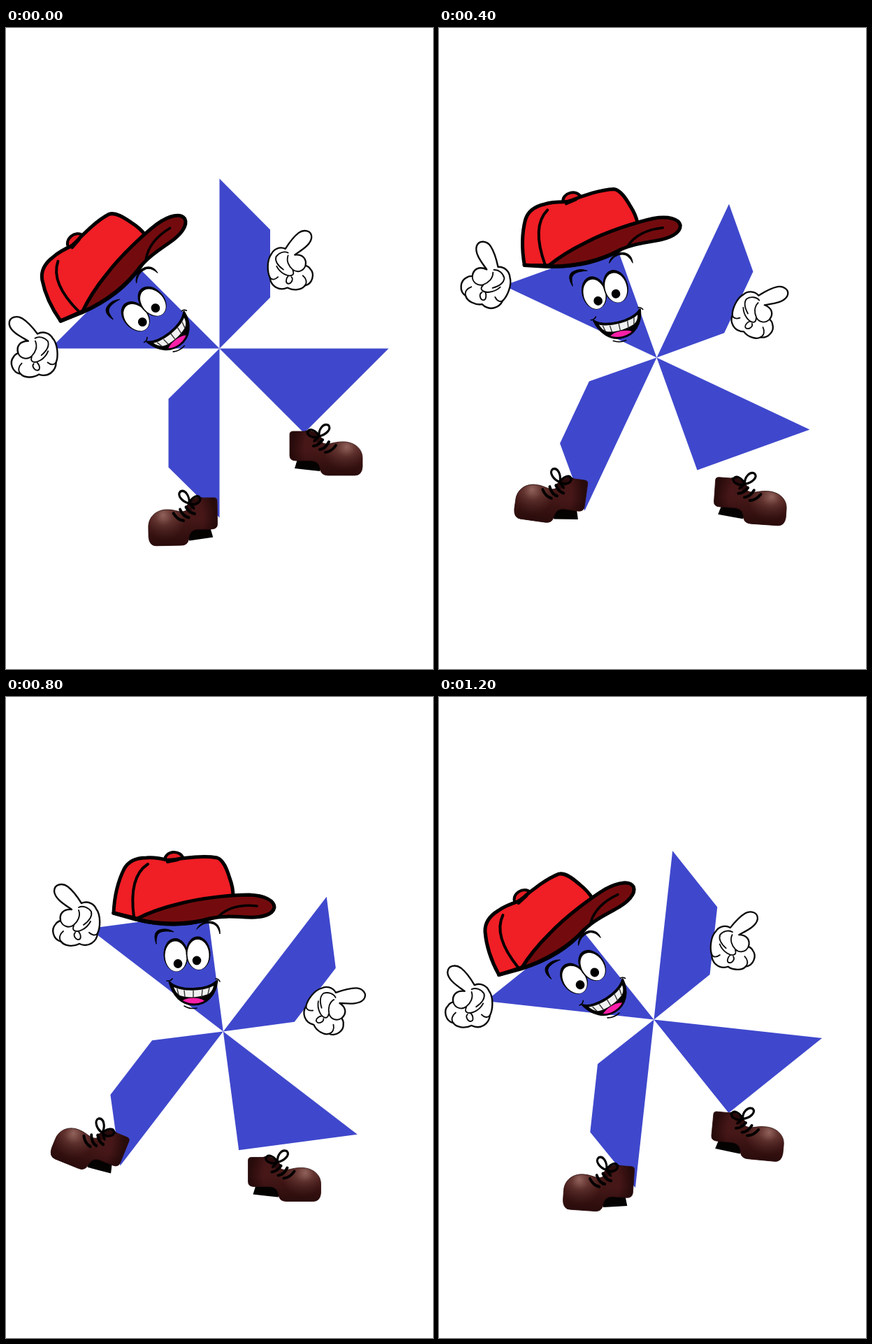
Write an HTML page with a canvas that moves like this. It is 611 px wide and 917 px high and loops after 1300 ms.

```html
<!DOCTYPE html>
<html lang="en">
<head>
<meta charset="utf-8">
<title>Dancing pinwheel</title>
<style>
html, body { margin: 0; width: 100%; height: 100%; overflow: hidden; background: #fff; }
canvas { display: block; width: 611px; height: 917px; }
</style>
</head>
<body>
<canvas id="stage" width="611" height="917"></canvas>
<script>
const ctx = document.getElementById('stage').getContext('2d');
const RAD = Math.PI / 180;
const STEP = 100;
const ORDER = [0, 1, 2, 3, 4, 5, 6, 6, 5, 4, 3, 2, 1];
const TOP = 37.5; // body angle at which the head stands upright

// hub position, body angle, left shoe tilt, right shoe centre and tilt
const POSES = [
  { x: 305, y: 458, a: 0, tilt: -1, shoe: [457.5, 603.5, 0] },
  { x: 307, y: 461, a: 6.3, tilt: 4, shoe: [442, 624, 5.5] },
  { x: 308.3, y: 464, a: 12, tilt: 10, shoe: [437, 641, 6] },
  { x: 309.5, y: 467, a: 17.4, tilt: 16, shoe: [435, 658, 6] },
  { x: 311, y: 471, a: 25.2, tilt: 8, shoe: [445.5, 672.5, 4] },
  { x: 310.3, y: 478, a: TOP, tilt: 22, shoe: [398, 685, 0] }
];
POSES.push({ ...POSES[5], jump: true });

const p = d => new Path2D(d);

function fill(path, color) {
  ctx.fillStyle = color;
  ctx.fill(path);
}

function line(path, width, color = '#000') {
  ctx.lineWidth = width;
  ctx.strokeStyle = color;
  ctx.stroke(path);
}

function oval(x, y, rx, ry, turn = 0) {
  const o = new Path2D();
  o.ellipse(x, y, rx, ry, turn * RAD, 0, 2 * Math.PI);
  return o;
}

function group(x, y, deg, draw) {
  ctx.save();
  ctx.translate(x, y);
  ctx.rotate(deg * RAD);
  draw();
  ctx.restore();
}

function orbit(pose, dx, dy) {
  const c = Math.cos(pose.a * RAD), s = Math.sin(pose.a * RAD);
  return [pose.x + dx * c - dy * s, pose.y + dx * s + dy * c];
}

const blades = p('M0 0V-243L72.5-170V-73ZM0 0H242L121 121ZM0 0L-73 72V170L0 242ZM0 0H-242L-121-121Z');

const cap = {
  button: p('M227 233C228 219 251 218 254 232Z'),
  crown: p('M154 309C155 285 160 264 169 246C175 235 186 230 201 230C212 229 222 231 234 234C258 229 285 227 302 230C311 233 316 246 320 259C323 267 325 276 325 285L270 294L215 308L188 317Z'),
  brim: p('M186 318C203 309 222 302 247 296C280 287 325 283 348 283C370 284 384 291 384 301C382 312 365 316 345 315C325 314 308 313 292 317C262 327 225 328 186 318Z'),
  seam: p('M203 239C183 252 178 278 183 315'),
  rim: p('M154 309L186 318C224 327 262 326 292 317'),
  fold: p('M305 313C316 303 332 296 359 299'),
  stitch: p('M231 236L246 233')
};

function drawCap() {
  fill(cap.button, '#e51c23');
  line(cap.button, 4);
  fill(cap.crown, '#f01e25');
  line(cap.crown, 5);
  line(cap.seam, 4);
  line(cap.stitch, 4);
  fill(cap.brim, '#730b0e');
  line(cap.brim, 5);
  line(cap.rim, 5.5);
  line(cap.fold, 3.5);
}

const face = {
  browL: p('M215 353C211 342 213 335 220 333C227 331 234 332 240 336C228 334 220 335 217 340C215 344 215 348 215 353Z'),
  browR: p('M273 332C277 323 288 319 297 322C304 325 307 331 306 339C304 330 300 325 294 324C286 322 280 325 273 332Z'),
  mouth: p('M234 408C246 421 288 421 302 406C300 426 287 440 269 440C251 440 239 427 234 408Z'),
  teeth: p('M240 415C254 422 284 421 297 413C296 419 293 423 289 425C276 430 259 431 249 427C244 424 242 420 240 415Z'),
  gaps: p('M245 418L247 426M255 420L256 429M268 420V430M281 419L280 429M291 416L289 425'),
  creases: p('M230 406Q235 407 238 403M300 403Q304 403 306 407M255 442Q263 447 273 445')
};

function drawFace() {
  for (const brow of [face.browL, face.browR]) {
    fill(brow, '#000');
    line(brow, 1);
  }
  for (const [x, y, px, py] of [[243, 370, 246, 381.5], [275, 367.5, 273, 377]]) {
    fill(oval(x, y - 1, 17.5, 24, -4), '#000');
    fill(oval(x, y + 1, 15.5, 21.5, -4), '#fff');
    fill(oval(px, py, 6.3, 6.5), '#000');
  }
  fill(face.mouth, '#000');
  ctx.save();
  ctx.clip(face.mouth);
  fill(oval(268, 438, 18, 7.5), '#fb1fa8');
  ctx.restore();
  fill(face.teeth, '#f0f0f0');
  line(face.gaps, 1.4, '#333');
  line(face.mouth, 2.8);
  line(face.creases, 1.6);
}

// hand coordinates are centred on the fist at (101, 329)
const hand = {
  shape: p('M94 304C84 297 70 289 69 278C69 267 81 266 88 271C96 277 103 287 108 295C117 291 126 296 129 303C136 312 135 330 131 338C130 350 118 359 105 353C96 358 83 356 79 350C67 347 64 332 71 325C72 323 75 321 78 320C76 310 82 303 94 304Z'),
  folds: p('M78 320C81 329 91 331 97 326C103 321 107 313 104 305M104 301C110 298 118 301 122 307C124 315 118 321 111 326M97 327C93 335 101 337 109 333C115 330 119 325 121 321M79 350C75 345 77 339 82 335M99 337C95 341 101 350 106 346C108 343 106 338 104 336M131 338C128 342 123 341 119 337')
};

function drawHand(x, y, deg, scale) {
  group(x, y, deg, () => {
    ctx.scale(scale, Math.abs(scale));
    ctx.translate(-101, -329);
    fill(hand.shape, '#fff');
    line(hand.shape, 2.4, '#0a0a0a');
    line(hand.folds, 1.9, '#0a0a0a');
  });
}

// shoe coordinates are centred on (457.5, 603.5)
const shoe = {
  heel: p('M417 617L413 630Q430 632 449 634L455 620Z'),
  upper: p('M406 581Q406 577 411 577H427C436 580 445 587 454 594C462 597 469 592 480 592C497 591 510 601 510 615V628Q509 640 499 640H461Q452 640 450 633C449 625 446 620 437 619H415Q406 619 406 612Z'),
  tongue: p('M427 577C434 573 444 577 455 590L448 596Z'),
  laces: p('M440 598Q448 597 453 589M449 603Q457 602 462 592M457 607Q466 606 472 597'),
  bow: p('M448 584C438 588 429 582 432 577C435 572 444 576 448 584C447 574 454 565 461 568C467 573 458 582 448 584L441 591')
};
const leather = ctx.createRadialGradient(488, 599, 1, 480, 607, 72);
leather.addColorStop(0, '#8d5f58');
leather.addColorStop(.17, '#633430');
leather.addColorStop(.42, '#451817');
leather.addColorStop(.75, '#471718');
leather.addColorStop(1, '#280b0b');
const shade = ctx.createLinearGradient(0, 605, 0, 641);
shade.addColorStop(0, 'rgba(25,4,4,0)');
shade.addColorStop(1, 'rgba(25,4,4,.65)');

function drawShoe(x, y, deg, sx = 1, sy = 1) {
  group(x, y, deg, () => {
    ctx.scale(sx, sy);
    ctx.translate(-457.5, -603.5);
    fill(shoe.heel, '#050202');
    fill(shoe.upper, leather);
    fill(shoe.upper, shade);
    line(shoe.upper, .8, '#2b0d0d');
    fill(shoe.tongue, '#2a0b0c');
    line(shoe.laces, 4);
    line(shoe.bow, 3.2);
  });
}

function drawPose(pose) {
  const off = (x, y) => pose.jump ? [x, y] : [0, 0];
  ctx.fillStyle = '#fff';
  ctx.fillRect(0, 0, 611, 917);
  ctx.lineCap = ctx.lineJoin = 'round';

  group(pose.x + .5, pose.y + .5, pose.a, () => fill(blades, '#3f48cc'));

  const head = (draw, [dx, dy]) => group(pose.x + dx, pose.y + dy, pose.a - TOP, () => {
    ctx.translate(-310.3, -478);
    draw();
  });
  head(drawCap, off(10.5, -38));
  head(drawFace, [0, 0]);

  if (pose.a === TOP) {
    const [dx, dy] = off(-41, -27);
    drawHand(101 + dx, 329 + dy, 0, 1);
  } else {
    const [x, y] = orbit(pose, -264, 14);
    drawHand(x, y, pose.a - 5, 1);
  }

  const [rx, ry] = orbit(pose, 101.5, -109.5), [rdx, rdy] = off(27, 13);
  drawHand(rx + rdx, ry + rdy, pose.a, -.96);

  const [lx, ly] = orbit(pose, -51.5, 243), [ldx, ldy] = off(-28, 24);
  drawShoe(lx + ldx, ly + ldy, pose.tilt, -.95, 1.07);
  drawShoe(...pose.shoe);
}

const start = performance.now();
function tick() {
  const t = Math.max(0, performance.now() - start);
  drawPose(POSES[ORDER[Math.floor(t / STEP) % ORDER.length]]);
  requestAnimationFrame(tick);
}
tick();
</script>
</body>
</html>
```
